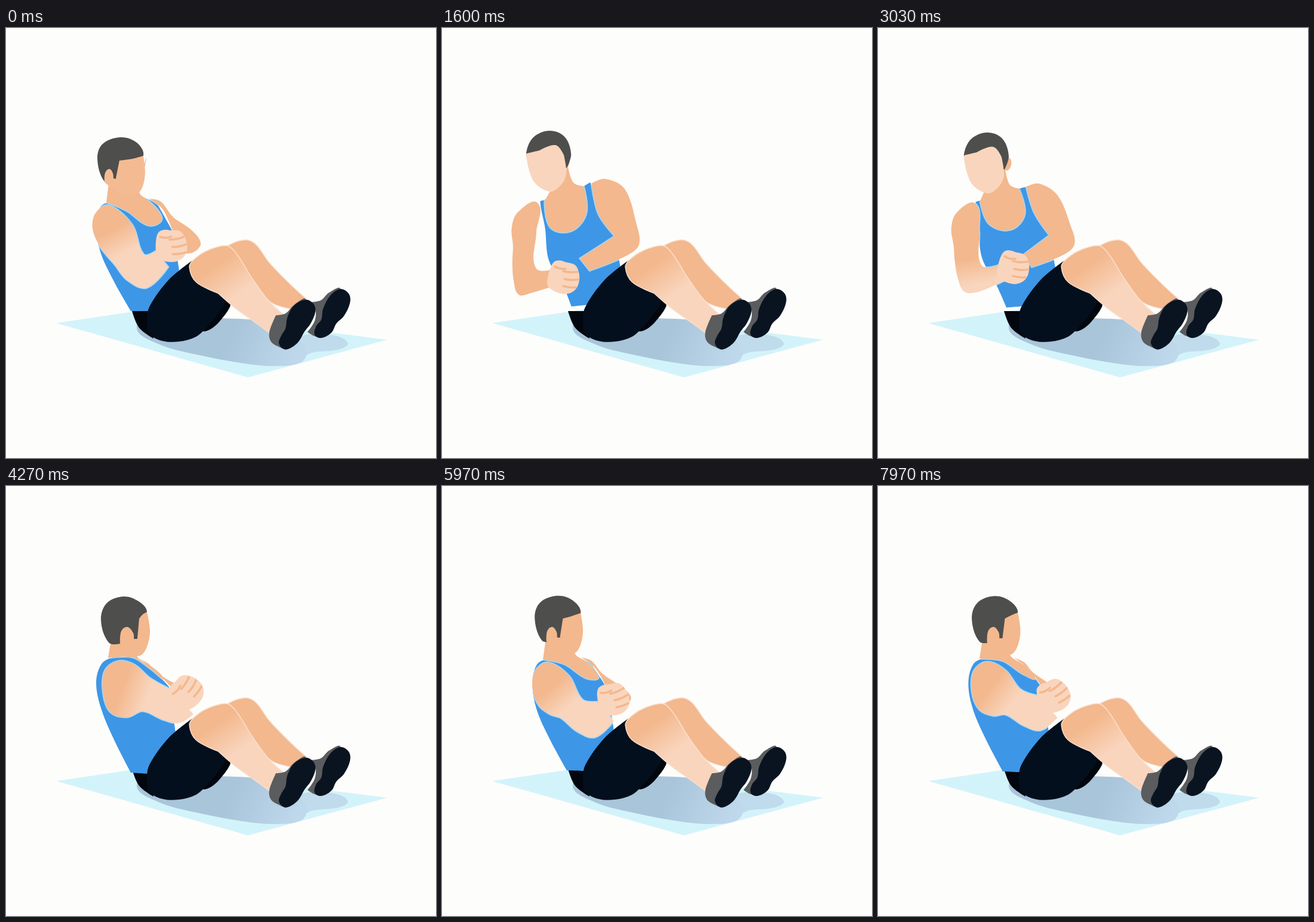
An HTML page with a canvas that plays this animation: 720 by 720 pixels, repeating every 8000 ms.

```html
<!DOCTYPE html>
<html lang="en">
<head>
<meta charset="utf-8">
<title>Seated twist</title>
<style>
html, body { margin: 0; width: 100%; height: 100%; overflow: hidden; background: #fdfdfc; }
canvas { display: block; width: 100vw; height: 100vh; }
</style>
</head>
<body>
<canvas id="stage" width="720" height="720"></canvas>
<script>
const ctx = document.getElementById('stage').getContext('2d');
const LOOP = 8000, TURN = 640;
const BACK = '#fdfdfc', BLUE = '#3e96e6', EDGE = '#a4d8f6', HAIR = '#4e4e4d';
const SHOE = '#5a5c5e', SOLE = '#0a1421', SHORTS = '#040f1d', RIM = '#fae0cf';
const DEEP = [243, 184, 141], PALE = [249, 213, 189];
const rgb = c => `rgb(${c.map(Math.round)})`;
const SKIN = rgb(DEEP), LIGHT = rgb(PALE);

// Start of each turn; even ones go right, odd ones left.
const STARTS = [-420, 600, 1560, 2600, 3610, 4600, 5500, 6500, 7450];

// Three poses: left, half right, right. Points are "x,y"; a star marks a sharp corner.
const KEYS = [0.25, 0.74, 1];
const BODY = {
  tank: [
    '171,289 163,293 168,335 174,385 198,430 215,468* 241,466* 297,402* 287,347* 249,266* 236,269*',
    '176,291 158,300 152,335 158,375 181,425 209,474 238,474 290,405 280,342 252,292 230,284',
    '180,287 160,298 151,330 160,375 181,425 209,480 238,482 284,412 273,336 245,306 215,287'
  ],
  chest: [
    '183,262* 171,290* 186,328 222,338 246,312 236,269* 221,263 213,235*',
    '173,252 168,292 202,306 240,331 261,318 232,284 224,277 220,245',
    '176,258 171,288 212,287 243,307 264,322 240,300 220,286 216,250'
  ],
  far: [
    '248,266* 270,261 300,280 322,330 329,362 310,380 258,400* 243,380* 287,347* 262,310',
    '240,286 258,290 280,317 310,338 326,360 315,375 296,378 285,360 280,342 262,303',
    '222,289 238,297 250,310 272,325 300,340 300,350 290,350 280,340 268,328 246,306'
  ],
  near: [
    '163,294 132,309 123,335 127,365 129,390 134,418 145,441 168,442 212,423* 205,396* 174,397 170,340',
    '172,297 150,310 145,335 155,362 168,380 182,396 203,422 236,435 272,400 250,374 231,379 212,330',
    '188,293 165,310 163,350 176,380 204,387 229,377 262,391 290,397 314,382 275,340 242,322 215,299'
  ]
};
const HEAD = {
  skull: [
    '150,225 144,212 156,186 183,175 208,185 219,214 212,237* 190,235',
    '164,256 153,218 162,194 192,183 219,192 230,214 205,245 180,257',
    '172,262 159,225 168,197 196,185 222,193 236,211 222,256 192,264'
  ],
  face: [
    '207,216* 211,240 209,255 198,270 183,277 158,262 147,235* 145,224 144,219 144,216 144,214* 145,213* 166,208* 193,199',
    '230,214 233,240 230,262 221,277 205,280 180,270 165,258 166,243 173,236 179,243 180,252 184,253 190,222 212,219',
    '236,211 241,240 238,263 228,282 214,284 196,272 191,263 193,243 203,236 213,246 214,256 220,256 223,222 229,215'
  ]
};

const read = s => s.split(' ').map(p => {
  const [x, y] = p.split(',').map(parseFloat);
  return { x, y, sharp: p.endsWith('*') };
});

// Closed smooth curve through the points, straight into the sharp ones.
function curve(pts) {
  const n = pts.length, path = new Path2D();
  const handle = (a, p, b, len) => {
    const dx = b.x - a.x, dy = b.y - a.y, k = p.sharp ? 0 : len / 3 / (Math.hypot(dx, dy) || 1);
    return [p.x + dx * k, p.y + dy * k];
  };
  path.moveTo(pts[0].x, pts[0].y);
  for (let i = 0; i < n; i++) {
    const a = pts[(i + n - 1) % n], p = pts[i], q = pts[(i + 1) % n], b = pts[(i + 2) % n];
    const len = Math.hypot(q.x - p.x, q.y - p.y);
    path.bezierCurveTo(...handle(a, p, q, len), ...handle(b, q, p, len), q.x, q.y);
  }
  path.closePath();
  return path;
}
const shape = s => curve(read(s));

function shade(x1, y1, x2, y2, from, to) {
  const g = ctx.createLinearGradient(x1, y1, x2, y2);
  g.addColorStop(0, from);
  g.addColorStop(1, to);
  return g;
}
function fill(path, color, rim) {
  ctx.fillStyle = color;
  ctx.fill(path);
  if (rim) {
    ctx.strokeStyle = rim;
    ctx.lineWidth = 1.5;
    ctx.stroke(path);
  }
}

const readAll = set => Object.fromEntries(Object.entries(set).map(([name, rows]) => [name, rows.map(read)]));
const body = readAll(BODY), head = readAll(HEAD);

function pose(rows, i, k) {
  return curve(rows[i].map((p, j) => {
    const q = rows[i + 1][j];
    return { x: p.x + (q.x - p.x) * k, y: p.y + (q.y - p.y) * k, sharp: rows[0][j].sharp };
  }));
}

const floor = [
  [shape('84,494* 240,471* 638,522* 405,585*'), '#d3f3fa'],
  [shape('500,514 545,514 572,527 558,538 515,543 490,550 470,530'), '#c0dbec'],
  [shape('219,500 260,485 360,486 425,490 462,502 490,522 504,540 494,560 450,566 400,562 320,547 255,529'),
    shade(380, 510, 490, 556, '#a9c5da', '#bfd8ec')]
];
const hip = shape('211,474* 243,474* 247,520* 223,502');
const legs = [
  [shape('372,364* 388,357 405,355 420,364 441,393 478,431 509,459* 512,472* 480,471* 443,459 400,410'), SKIN, RIM],
  [shape('509,459* 527,456 541,443 560,437 545,480 530,515 517,516 505,509* 517,490 518,472'), SHOE],
  [shape('560,437 574,445 576,460 566,482 553,495 545,510 528,519 517,514 519,500 528,488 531,470 543,448'), SOLE],
  [shape('375,455* 375,467 357,492 343,504 330,508 300,500* 345,440*'), '#02070e'],
  [shape('314,388* 307,400 318,425 355,444* 367,452 364,466 337,500 318,517 290,525 262,524 240,512 236,492 240,467 273,421'), SHORTS],
  [shape('314,388* 330,376 352,367 372,365 388,381 412,419 440,457 466,481* 443,512* 420,495 385,470 355,444* 318,425 307,400'),
    shade(366, 388, 400, 438, SKIN, LIGHT), RIM],
  [shape('452,481* 468,478 483,463 502,455 490,500 470,536 455,533 443,524 441,509'), SHOE],
  [shape('502,455 515,462 518,475 510,495 500,508 490,525 478,535 466,538 457,528 461,515 468,503 471,485 482,465'), SOLE]
];
const fist = shape('-27,8 -22,-14 -15,-26 -5,-28 5,-25 19,-21 25,-12 27,4 21,20 6,28 -12,25 -25,16');
const gaps = new Path2D('M0 -10Q12 -7 24 -9M2 3Q13 6 25 4M0 15Q12 18 21 17M-14 -18Q-6 -13 4 -14');

// 0 = turned fully left, 1 = fully right
function twist(t) {
  const n = STARTS.findLastIndex(s => s <= t);
  const s = Math.min(1, (t - STARTS[n]) / TURN);
  const ease = (1 - Math.cos(Math.PI * s)) / 2;
  return n % 2 ? 1 - ease : ease;
}

function drawHands(u) {
  ctx.save();
  ctx.translate(202 + 100 * u, 418 - 73 * u);
  ctx.rotate(-Math.PI / 3 * u ** 5);
  fill(fist, LIGHT);
  ctx.strokeStyle = SKIN;
  ctx.lineWidth = 3.5;
  ctx.lineCap = 'round';
  ctx.stroke(gaps);
  ctx.restore();
}

function drawHead(u, i, k) {
  const lean = 10 * Math.min(k, 0), turn = Math.max(k, 0);
  const tone = Math.min(1, Math.max(0, (u - 0.25) / 0.55));
  const earWidth = Math.max(0, 6.5 * (0.8 - u) / 0.55);
  ctx.save();
  ctx.translate(lean, lean);
  const ear = new Path2D();
  ear.ellipse(209 + 32 * u, 228, Math.min(7, earWidth), 11, 0.2, 0, 2 * Math.PI);
  fill(ear, SKIN);
  fill(pose(head.skull, i, turn), HAIR);
  fill(pose(head.face, i, turn), rgb(PALE.map((v, j) => v + (DEEP[j] - v) * tone)));
  ctx.restore();
}

function draw(t) {
  const u = twist(t);
  const i = u > KEYS[1] ? 1 : 0;
  // Left of the first pose the motion carries on, damped.
  const k = u < KEYS[0] ? 1.2 * (u - KEYS[0]) : (u - KEYS[i]) / (KEYS[i + 1] - KEYS[i]);
  const part = {};
  for (const name in body) part[name] = pose(body[name], i, k);

  ctx.fillStyle = BACK;
  ctx.fillRect(0, 0, 720, 720);
  for (const [path, color] of floor) fill(path, color);

  fill(hip, '#02070e');
  fill(part.tank, BLUE);
  ctx.save();
  ctx.clip(part.tank);
  ctx.strokeStyle = EDGE;
  ctx.lineWidth = 3;
  for (const name of ['chest', 'far', 'near']) ctx.stroke(part[name]);
  ctx.restore();

  fill(part.chest, SKIN);
  fill(part.far, SKIN);
  const x = 130 + 65 * u, y = 335 + 120 * (1 - u) ** 3;
  const angle = (80 - 60 * u ** 4) * Math.PI / 180;
  fill(part.near, shade(x, y, x + 45 * Math.cos(angle), y + 45 * Math.sin(angle), SKIN, LIGHT));
  drawHands(u);
  drawHead(u, i, k);
  for (const leg of legs) fill(...leg);
}

const begin = performance.now();
function tick() {
  draw((performance.now() - begin) % LOOP);
  requestAnimationFrame(tick);
}
tick();
</script>
</body>
</html>
```
